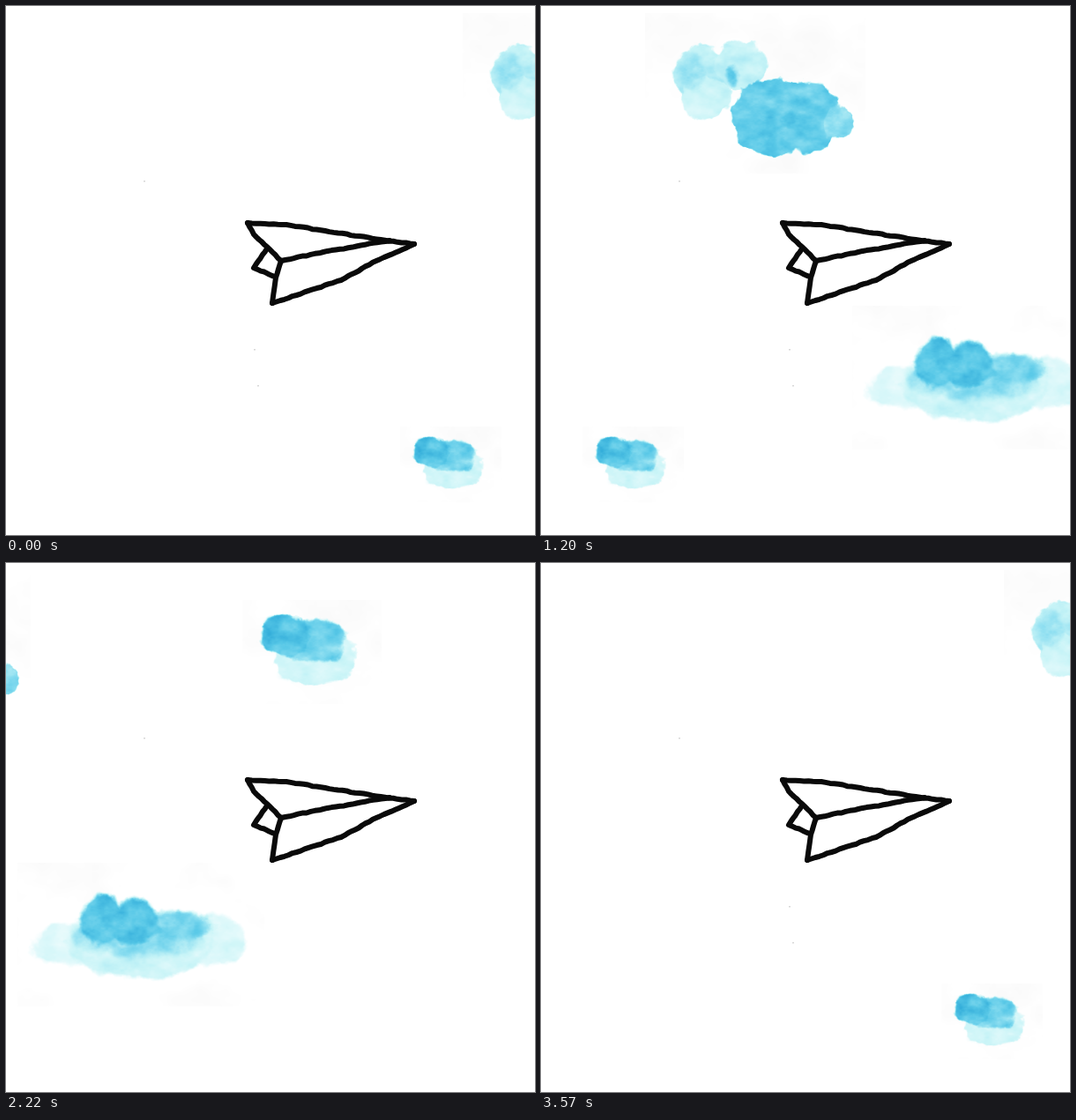
Recreate the animation shown at these times as an HTML page with a canvas. Size 600 px wide and 600 px high, loop 3600 ms.

```html
<!DOCTYPE html>
<html lang="en">
<head>
<meta charset="utf-8">
<title>Paper plane</title>
<style>
html, body { margin: 0; width: 100%; height: 100%; overflow: hidden; background: #fff; }
canvas { display: block; width: 600px; height: 600px; }
</style>
</head>
<body>
<canvas id="stage" width="600" height="600"></canvas>
<script>
const SIZE = 600, STEP_MS = 30, STEPS = 120, SPEED = 10, WRAP = 1197;
const INKS = [[255, 255, 255], [200, 244, 247], [138, 221, 240], [88, 200, 231], [52, 174, 218]];

const ctx = document.getElementById('stage').getContext('2d');
const clamp = v => Math.max(0, Math.min(1, v));
const mix = (a, b, k) => a + (b - a) * k;
const smooth = v => v * v * (3 - 2 * v);

function hash(x, y) {
  const v = Math.sin(x * 127.1 + y * 311.7) * 43758.5453;
  return v - Math.floor(v);
}

function noise(x, y) {
  const i = Math.floor(x), j = Math.floor(y), u = smooth(x - i), v = smooth(y - j);
  return mix(mix(hash(i, j), hash(i + 1, j), u), mix(hash(i, j + 1), hash(i + 1, j + 1), u), v);
}

// Layered noise, centred on zero.
function fractal(x, y) {
  let sum = 0;
  for (let k = 0, f = 1; k < 4; k++, f *= 2) sum += (noise(x * f, y * f) - 0.5) / f;
  return sum;
}

function ink(tone) {
  const t = clamp(tone) * (INKS.length - 1), i = Math.min(INKS.length - 2, Math.floor(t));
  return INKS[i].map((c, k) => mix(c, INKS[i + 1][k], t - i));
}

// Paint a cloud on its own paper; lobe: x, y, rx, ry, tone, edge softness.
function watercolour(left, top, width, height, lobes) {
  const canvas = document.createElement('canvas');
  canvas.width = width;
  canvas.height = height;
  const g = canvas.getContext('2d'), image = g.createImageData(width, height);
  for (let row = 0; row < height; row++) {
    for (let col = 0; col < width; col++) {
      const x = left + col, y = top + row;
      const ragged = fractal(x / 13, y / 13) * 6;
      let tone = 0;
      for (const [cx, cy, rx, ry, depth, soft = 2.5] of lobes) {
        const d = (1 - Math.hypot((x - cx) / rx, (y - cy) / ry)) * Math.min(rx, ry) + ragged;
        if (d > 0) tone = mix(tone, depth, smooth(clamp(d / soft)));
      }
      const grain = fractal(x / 17 + 50, y / 12 + 50) * 0.3;
      const stain = 8 * Math.max(0, fractal(x / 60, y / 45));
      ink(tone + grain * clamp(tone * 1.8)).forEach((c, k) => {
        image.data[4 * (row * width + col) + k] = c - stain * clamp(1 - 5 * tone);
      });
      image.data[4 * (row * width + col) + 3] = 255;
    }
  }
  g.putImageData(image, 0, 0);
  return { canvas, left, top, width, height };
}

const twin = watercolour(198, 8, 250, 182, [
  [262, 78, 33, 35, 0.3],
  [306, 66, 32, 28, 0.26],
  [267, 104, 30, 25, 0.22],
  [249, 72, 20, 24, 0.46, 12],
  [296, 77, 11, 13, 0.62, 7],
  [341, 126, 48, 45, 0.69],
  [380, 124, 38, 41, 0.68],
  [417, 131, 16, 20, 0.56],
  [361, 128, 12, 13, 0.88, 8]
]);

const puff = watercolour(268, 42, 158, 118, [
  [350, 105, 51, 33, 0.22],
  [350, 88, 39, 27, 0.6, 5],
  [316, 81, 30, 26, 0.74, 4],
  [302, 76, 15, 20, 0.86, 10],
  [346, 124, 42, 14, 0.2, 10]
]);

const bank = watercolour(273, 340, 280, 163, [
  [335, 433, 52, 27, 0.15, 6],
  [492, 427, 44, 33, 0.16, 6],
  [410, 434, 85, 41, 0.24, 6],
  [410, 420, 84, 32, 0.5, 16],
  [452, 409, 48, 20, 0.6, 8],
  [369, 404, 27, 31, 0.8, 7],
  [405, 406, 32, 30, 0.8, 7]
]);

// home: step at which the art sits where it was painted, moved by dx, dy.
const clouds = [
  { art: twin, home: 32, returns: true },
  { art: puff, home: 0, scale: 0.73, dx: 251, dy: 446, returns: true },
  { art: bank, home: 48 },
  { art: puff, home: 74 }
];

// A hand-drawn line: short segments with a little jitter.
function inkLine(points) {
  const path = new Path2D();
  points.forEach(([x, y], i) => {
    if (!i) return path.moveTo(x, y);
    const [px, py] = points[i - 1], n = Math.ceil(Math.hypot(x - px, y - py) / 5);
    for (let k = 1; k <= n; k++) {
      const wobble = k < n ? hash(k + x, y) - 0.5 : 0;
      path.lineTo(mix(px, x, k / n), mix(py, y, k / n) + wobble);
    }
  });
  return path;
}

const nose = [463, 270], wing = [274, 246], keel = [302, 337], fold = [312, 289];
const lines = [
  [wing, [318, 248], [362, 255], [425, 265], nose],
  [nose, [420, 289], [380, 311], keel],
  [keel, [306, 308], fold],
  [fold, [296, 273], [281, 259], wing],
  [fold, [360, 279], [435, 266]],
  [[296, 275], [281, 297], [305, 307]]
].map(inkLine);

function drawPlane() {
  ctx.strokeStyle = '#0a0a0a';
  ctx.lineCap = ctx.lineJoin = 'round';
  ctx.lineWidth = 6;
  lines.forEach(line => ctx.stroke(line));
}

function draw(step) {
  ctx.fillStyle = '#fff';
  ctx.fillRect(0, 0, SIZE, SIZE);
  ctx.fillStyle = '#d8d8d8';
  [[156, 198], [281, 389], [285, 430]].forEach(([x, y]) => ctx.fillRect(x, y, 2, 1.5));
  drawPlane();
  for (const { art, home, scale = 1, dx = 0, dy = 0, returns } of clouds) {
    const shift = (home - step) * SPEED + (returns && step >= 90 ? WRAP : 0);
    ctx.drawImage(art.canvas, art.left * scale + dx + shift, art.top * scale + dy,
      art.width * scale, art.height * scale);
  }
}

const start = performance.now();
function tick() {
  draw(Math.floor((performance.now() - start) / STEP_MS) % STEPS);
  requestAnimationFrame(tick);
}
tick();
</script>
</body>
</html>
```
